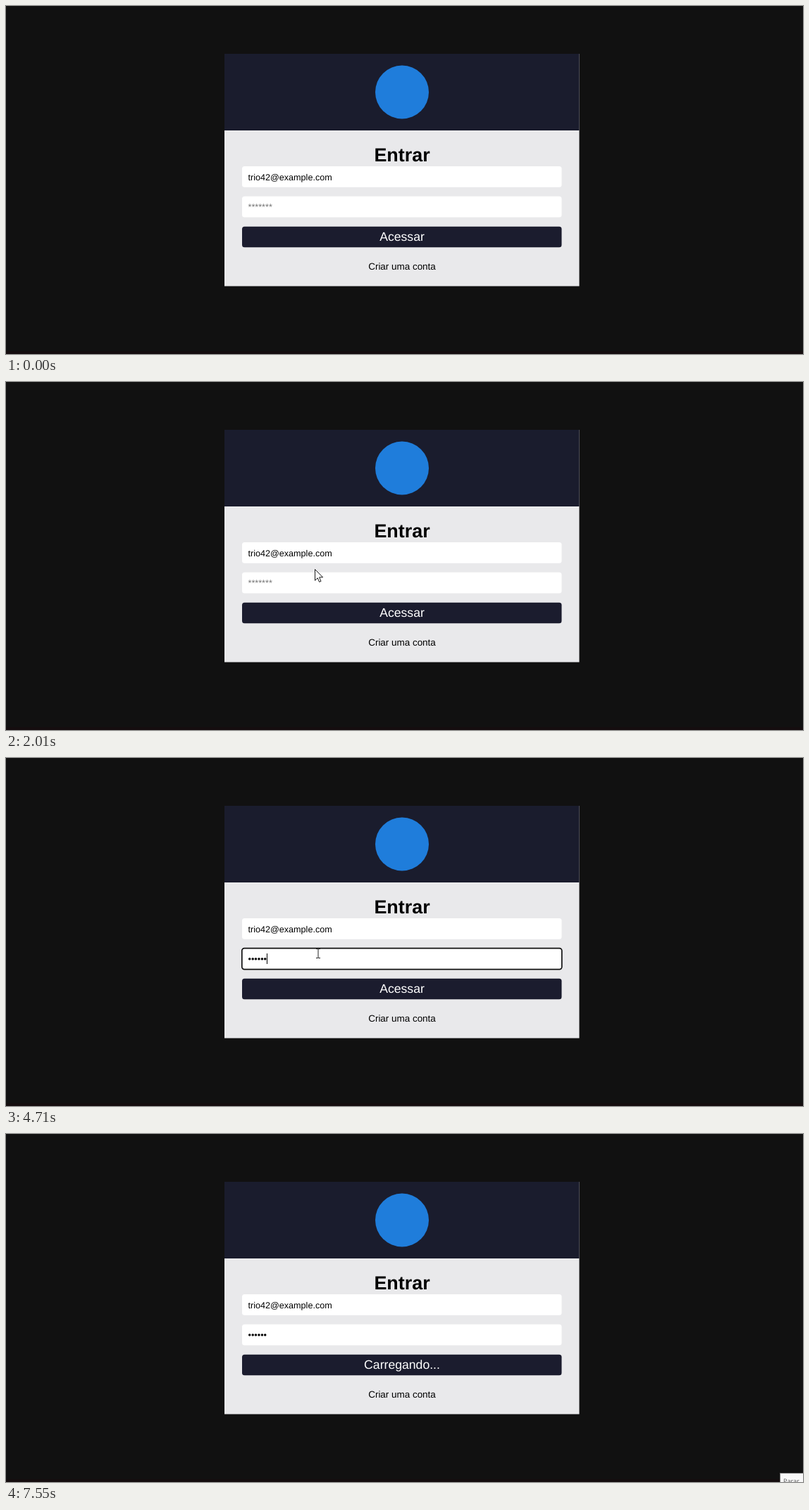
Animation, 1131 px wide and 495 px high, one loop 8 s. Source, as an HTML page:

```html
<!DOCTYPE html>
<html lang="pt-BR">
<head>
<meta charset="utf-8">
<title>Entrar</title>
<style>
  html, body { margin: 0; width: 100%; height: 100%; overflow: hidden; background: #111; }
  svg { display: block; width: 100%; height: 100%; }
  text { font-family: "Liberation Sans", Arial, sans-serif; text-rendering: geometricPrecision; }
  .mid { text-anchor: middle; }
  .field { font-size: 12.6px; }
  .tip { font: 9.1px "Open Sans", sans-serif; }
  .pointer { stroke-linejoin: round; }
</style>
</head>
<body>
<svg viewBox="0 0 1131 495">
  <rect width="1131" height="495" fill="#111"/>
  <rect y="491" width="1131" height="4" fill="#150d0f"/>

  <rect x="310" y="68" width="503.5" height="330.5" fill="#e9e9eb"/>
  <rect x="310" y="68" width="503.5" height="109" fill="#1a1c2d"/>
  <circle cx="562" cy="122.5" r="38" fill="#1f7ddb"/>

  <text class="mid" x="562" y="221.3" font-size="26.9" font-weight="bold">Entrar</text>
  <rect x="335" y="228" width="453.5" height="29.7" rx="3.5" fill="#fff"/>
  <text class="field" x="343.5" y="247.6">trio42@example.com</text>

  <rect x="335" y="270.7" width="453.5" height="29.7" rx="3.5" fill="#fff"/>
  <rect id="focus" x="334.8" y="270.6" width="454" height="30" rx="3.5" fill="none" stroke="#101010" stroke-width="1.7"/>
  <text id="password" class="field" x="343.5" y="290"></text>
  <rect id="caret" y="278" width="1" height="15"/>

  <rect x="335" y="313.8" width="453.5" height="29.4" rx="3.5" fill="#1b1c2e"/>
  <text id="button" class="mid" x="562" y="334" font-size="17.64" fill="#fff"></text>
  <text class="mid" x="562" y="375" font-size="13.44">Criar uma conta</text>

  <circle id="click" r="10" fill="#ff0" fill-opacity=".5"/>
  <g id="arrow" class="pointer">
    <path d="M.5 .5V16.3L4.2 12.8L6.6 18.4L9 17.4L6.6 11.8H11.6Z" fill="#fff" stroke="#000" stroke-width=".9"/>
  </g>
  <g id="beam" class="pointer" fill="none" stroke="#222" stroke-width="1">
    <path d="M-3 -6.5H-.8L0 -6L.8 -6.5H3M0 -6V6M-3 6.5H-.8L0 6L.8 6.5H3"/>
  </g>
  <g id="hand" class="pointer">
    <path d="M-1.6 .6Q0 -1.2 1 .6V6L2.2 5.4Q3.4 5.4 3.6 6.6Q5.4 6 5.8 7.4Q7.6 7.2 7.6 9V12.6Q7.4 15 5.8 18H-.6Q-2 14.8-4.4 11.6Q-4.8 9.4-1.6 11Z" fill="#fff" stroke="#111" stroke-width=".7"/>
  </g>

  <g id="tooltip">
    <rect x="1098.5" y="482.5" width="40" height="20" fill="#f9f9f9" stroke="#777"/>
    <text class="tip" x="1103" y="497.3" fill="#555">Parar</text>
  </g>
</svg>
<script>
const LOOP = 8000;
const el = id => document.getElementById(id);
const show = (id, on) => el(id).setAttribute("visibility", on ? "visible" : "hidden");
const within = (t, a, b) => t >= a && t < b;

const easeOut = p => 1 - (1 - p) ** 2;
const easeInOut = p => p * p * (3 - 2 * p);
const easeIn = p => p ** 1.5;
const linear = p => p;

// Pointer moves in discrete steps along quadratic curves.
const legs = [
  { start: 280, end: 980, steps: 11, ease: easeOut, path: [[1195, 516], [800, 410], [461, 281]] },
  { start: 1660, end: 1870, steps: 4, ease: easeOut, path: [[461, 281], [439, 270.5], [431, 257.8]] },
  { start: 2010, end: 2070, steps: 2, ease: linear, path: [[431, 257.8], [439, 264], [443, 277]] },
  { start: 4710, end: 5070, steps: 6, ease: easeInOut, path: [[443, 277], [440, 279], [482, 321]] },
  { start: 5670, end: 5880, steps: 4, ease: easeIn, path: [[482, 321], [740, 410], [1026, 478]] }
];
const keyTimes = [2550, 2880, 3610, 3980, 4240, 4510];

function pointerAt(t) {
  if (!within(t, 280, 5950)) return null;
  const leg = legs.filter(l => t >= l.start).pop();
  const done = (t - leg.start) / (leg.end - leg.start) * (leg.steps - 1);
  const step = Math.min(leg.steps, Math.floor(done + 1e-6) + 1);
  const p = leg.ease(step / leg.steps), q = 1 - p;
  const [a, b, c] = leg.path;
  return [0, 1].map(i => q * q * a[i] + 2 * q * p * b[i] + p * p * c[i]);
}

function pointerKind([x, y]) {
  const inForm = within(x, 335, 789);
  if (inForm && (within(y, 228, 257.7) || within(y, 270.4, 300.5))) return "beam";
  const onLink = within(x, 514, 610) && within(y, 361, 379);
  return inForm && within(y, 313.8, 343.2) || onLink ? "hand" : "arrow";
}

function drawPointer(t) {
  const pos = pointerAt(t);
  const kind = pos && pointerKind(pos);
  for (const id of ["arrow", "beam", "hand"]) show(id, id === kind);
  if (!pos) return show("click", false);
  const [x, y] = pos.map(Math.round);
  el(kind).setAttribute("transform", `translate(${x} ${y})`);
  el("click").setAttribute("cx", kind === "beam" ? x - 2 : x - 1);
  el("click").setAttribute("cy", y - 1);
  show("click", within(t, 2270, 2400) || within(t, 5270, 5400));
}

function drawForm(t) {
  const focused = within(t, 2270, 5270);
  const typed = keyTimes.filter(k => t >= k).length;
  const blinkOff = within(t, 3410, 3610) || t >= 5070;
  const password = el("password");
  password.textContent = typed ? "•".repeat(typed) : "*******";
  password.setAttribute("fill", typed ? "#000" : "#757575");
  el("caret").setAttribute("x", 343.5 + typed * 4.41);
  show("focus", focused);
  show("caret", focused && !blinkOff);
  el("button").textContent = t < 5470 ? "Acessar" : "Carregando...";
}

function render(t) {
  drawForm(t);
  drawPointer(t);
  show("tooltip", t >= 7480);
  el("tooltip").setAttribute("opacity", t < 7550 ? 0.5 : 1);
}

const origin = performance.now();
function tick() {
  render((performance.now() - origin) % LOOP);
  requestAnimationFrame(tick);
}
tick();
</script>
</body>
</html>
```
